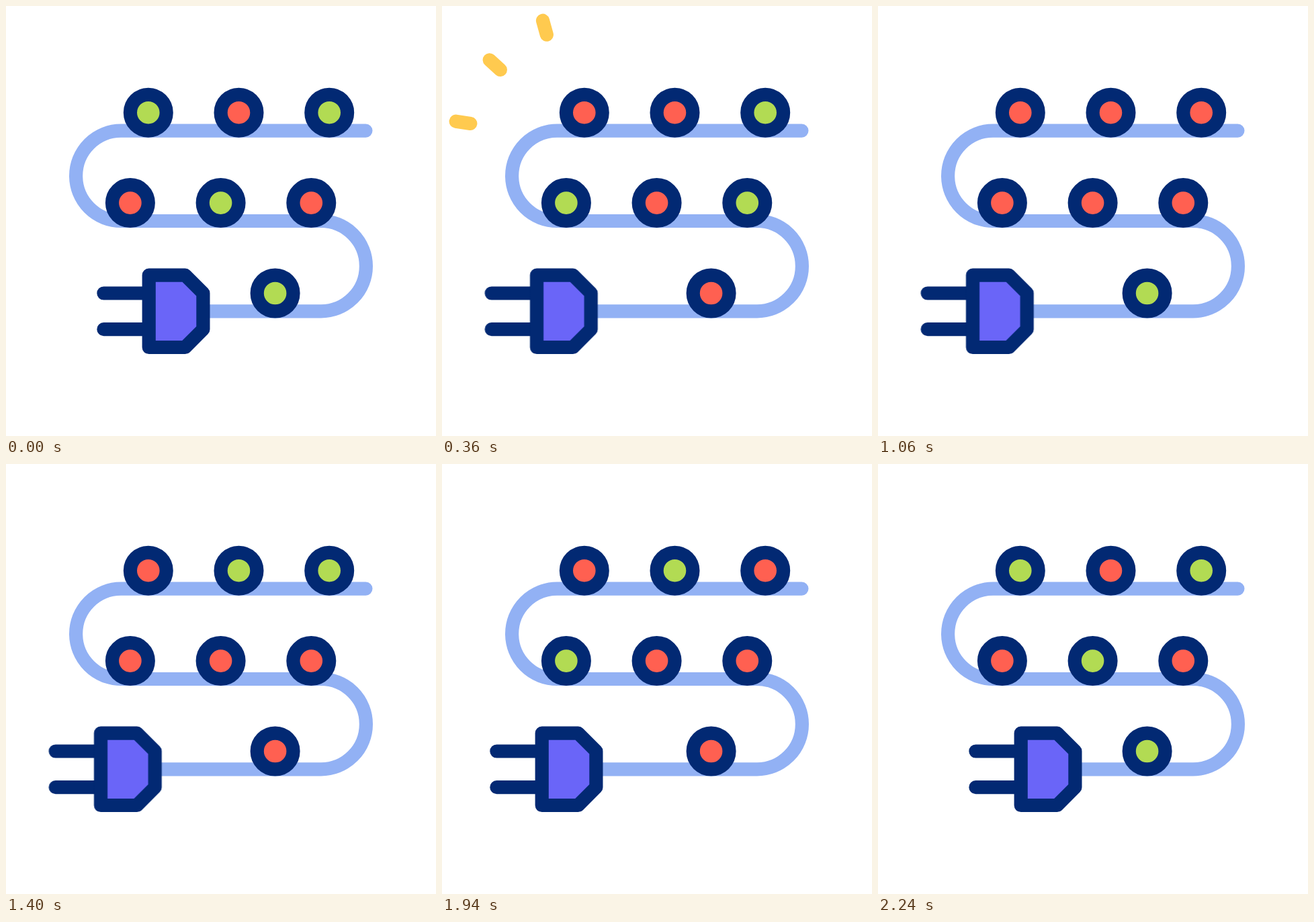
These frames come from a looping animation (640 by 640 pixels, 2400 ms). An HTML page:

```html
<!DOCTYPE html>
<html lang="en">
<head>
<meta charset="utf-8">
<title>String lights</title>
<style>
  html, body { margin: 0; height: 100%; overflow: hidden; background: #fff; }
  svg { display: block; width: 100vw; height: 100vh; }
  path, circle { fill: none; stroke-width: 20.2; stroke-linecap: round; stroke-linejoin: round; }
  .cable { stroke: #92b1f4; }
  .plug path, .lights circle { stroke: #022973; }
  .plug .body { fill: #6a65f8; }
  .plug { animation: slide 2400ms cubic-bezier(.333, 0, .667, 1) infinite; }
  .sparks path {
    stroke: #ffca4f;
    animation: burst 2400ms linear infinite, show 2400ms step-end infinite;
  }

  @keyframes slide {
    0%, 93.06%, 100% { transform: translateX(0); }
    15%, 77.78% { transform: translateX(-71.7px); }
  }
  @keyframes burst {
    0%, 10% { stroke-dasharray: 0 200; stroke-dashoffset: 0; }
    15% { stroke-dasharray: 55 200; stroke-dashoffset: -45; }
    20%, 100% { stroke-dasharray: 0 200; stroke-dashoffset: -100; }
  }
  @keyframes show {
    0% { opacity: 0; }
    10% { opacity: 1; }
    20%, 100% { opacity: 0; }
  }
</style>
</head>
<body>
<svg viewBox="0 0 640 640">
  <path class="cable" d="M535.4 185.6H171.3a67.2 67.2 0 0 0 0 134.4H468.7a67.2 67.2 0 0 1 0 134.4H222"/>
  <g class="lights"></g>
  <g class="plug">
    <path d="M145.4 427.5H212M145.4 481.2H212"/>
    <path class="body" d="M212.7 400.6H266.6L293.4 427.4V481.2L266.6 508H212.7Z"/>
  </g>
  <g class="sparks">
    <path pathLength="100" d="M160.7 60.2L150 21.7"/>
    <path pathLength="100" d="M100.3 107.2L70.7 80.3"/>
    <path pathLength="100" d="M60.3 177.7L20.7 171.7"/>
  </g>
</svg>
<script>
  const LOOP = 2400, GAP = 134.7;
  const COLORS = { g: '#b2db53', r: '#ff6051' };

  // The string's colours, g or r per light; within from..to ms the lights switch one by one
  const poses = [
    { from: 0, to: 0, colors: 'grgrgrg' },
    { from: 160, to: 360, colors: 'rrggrgr' },
    { from: 620, to: 780, colors: 'rrrgrrg' },
    { from: 860, to: 1400, colors: 'rggrrrr' },
    { from: 1420, to: 1700, colors: 'rrrgrgr' },
    { from: 1840, to: 2040, colors: 'rgrggrg' },
    { from: 2060, to: 2240, colors: 'grgrgrg' }
  ];
  const rows = [{ x: 211.8, count: 3 }, { x: 184.9, count: 3 }, { x: 400.6, count: 1 }];

  const group = document.querySelector('.lights');
  let index = 0;

  function addLight(x, y) {
    const bulb = document.createElementNS('http://www.w3.org/2000/svg', 'circle');
    bulb.setAttribute('cx', x);
    bulb.setAttribute('cy', y);
    bulb.setAttribute('r', 26.9);
    group.append(bulb);

    const light = index++;
    const stagger = (light * 3 % 7) / 6;
    const steps = poses.map(({ from, to, colors }) => ({
      fill: COLORS[colors[light]],
      offset: (from + (to - from) * stagger) / LOOP,
      easing: 'step-end'
    }));
    bulb.animate([...steps, { ...steps[0], offset: 1 }], { duration: LOOP, iterations: Infinity });
  }

  rows.forEach(({ x, count }, row) => {
    for (let i = 0; i < count; i++) addLight(x + i * GAP, 158.7 + row * 134.4);
  });
</script>
</body>
</html>
```
